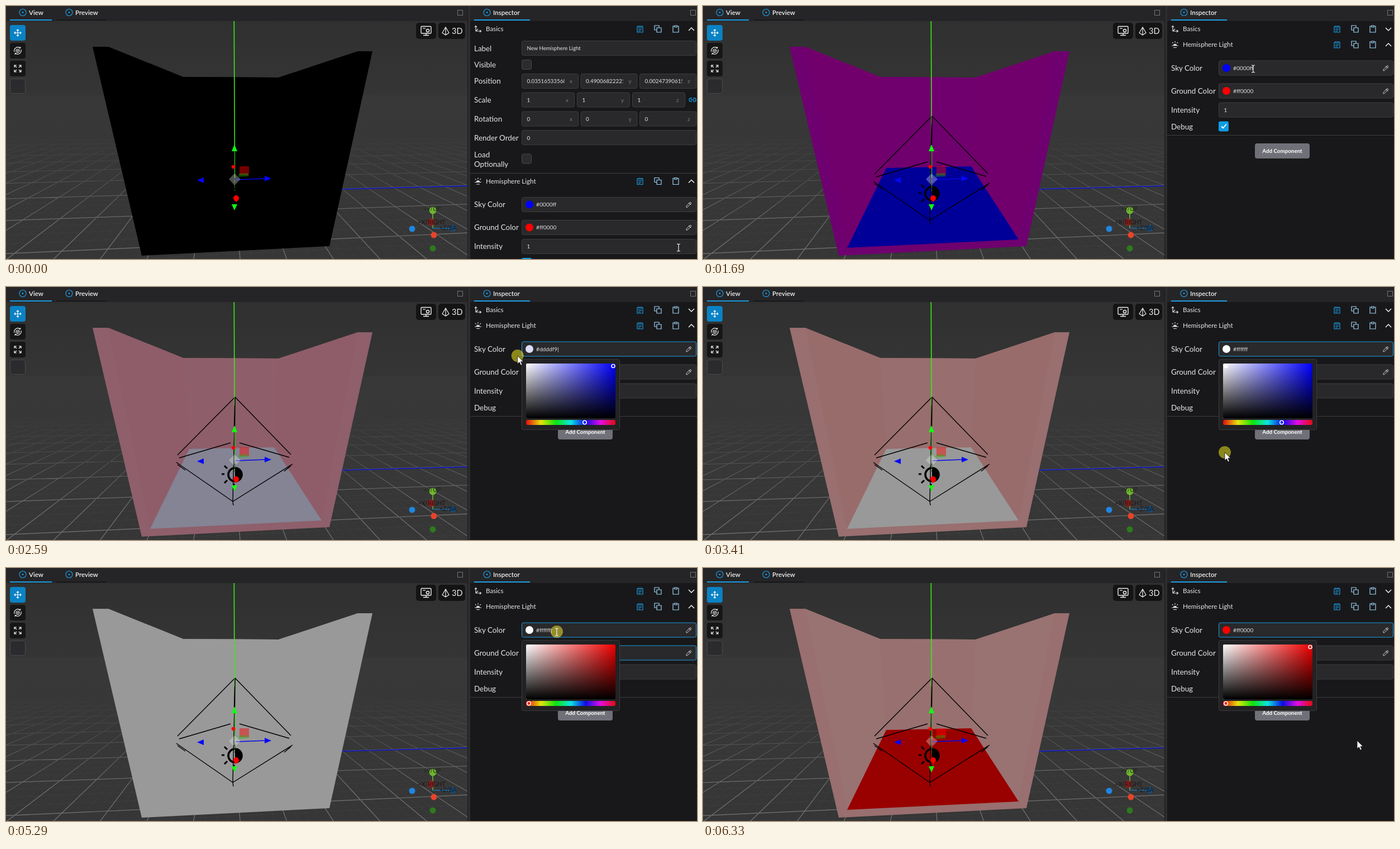
Write an HTML page that moves like this. It is 1237 by 453 pixels and loops after 6.4 s.

```html
<!DOCTYPE html>
<html lang="en">
<head>
<meta charset="utf-8">
<title>Hemisphere light editor</title>
<style>
html, body { margin: 0; width: 100%; height: 100%; overflow: hidden; background: #18181a; }
svg { display: block; }
text { font-family: Lato, Inter, sans-serif; white-space: pre; }
#press { mix-blend-mode: screen; }
</style>
</head>
<body>
<svg id="stage" width="1237" height="453" viewBox="0 0 1237 453"></svg>
<script>
const LOOP = 6400, BLUE = '#1b9ce3', LINE = '#3d3d40';
const stage = document.getElementById('stage');

// Markup helpers
const text = (x, y, s, size = 13.4, fill = '#e6e6e8', more = '') =>
  `<text x="${x}" y="${y + size * .36}" font-size="${size}" fill="${fill}" ${more}>${s}</text>`;
const rect = (x, y, w, h, fill, r = 0, more = '') =>
  `<rect x="${x}" y="${y}" width="${w}" height="${h}" rx="${r}" fill="${fill}" ${more}/>`;
const circle = (x, y, r, fill, more = '') =>
  `<circle cx="${x}" cy="${y}" r="${r}" fill="${fill}" ${more}/>`;
const stroke = (d, color, w = 1.3, more = '') =>
  `<path d="${d}" fill="none" stroke="${color}" stroke-width="${w}" ${more}/>`;
const poly = (pts, fill, more = '') => `<polygon points="${pts}" fill="${fill}" ${more}/>`;
const at = (x, y, s) => `<g transform="translate(${x} ${y})">${s}</g>`;

// Ground grid: perspective of the plane, x towards the back, z to the right
const ground = (x, z) => {
  const a = .17 * x, b = .0083 * z, w = 1 + a + b;
  return ((409 + a * 394 + b * 6400) / w).toFixed(1) + ' ' + ((333 + a * 155 + b * 155) / w).toFixed(1);
};
function gridPath(step, far, wide) {
  let d = '';
  for (let z = -wide; z <= wide; z += step) d += `M${ground(-3, z)}L${ground(far, z)}`;
  for (let x = -3; x <= far; x += step) d += `M${ground(x, -wide)}L${ground(x, wide)}`;
  return d;
}

function tab(x, label, lineX, lineW, color) {
  return circle(x, 11.5, 6, 'none', `stroke="${BLUE}" stroke-width="1.2"`) + circle(x, 11.5, 1.4, BLUE) +
    text(x + 11, 11.5, label, 11.5, '#f2f2f2', 'font-weight="600"') + rect(lineX, 24, lineW, 2, color);
}

const axes = () =>
  stroke('M764 366V398', '#5f9a35', 2) + stroke('M764 398H800', '#24608f', 2) +
  circle(764, 366, 6.5, '#6fb52e') + circle(761, 387, 6.5, '#8b1f1c') + circle(800, 398, 6, '#1c4a72') +
  text(763, 363, '+Y/UP', 10.5, '#1d2b18', 'text-anchor="middle"') +
  text(762, 387, '+X/RIGHT', 10.5, '#241414', 'text-anchor="middle"') +
  text(776, 397, '+Z/BA', 10.5, '#0d1d2c') +
  circle(727, 399, 5.5, '#1f86e0') + circle(766, 410, 5.5, '#e8432a') + circle(764, 434, 5.5, '#2e7a1d');

function tools() {
  const button = (y, fill, icon, edge = '') =>
    rect(7, y, 28, 28, fill, 4, edge && `stroke="${edge}"`) + at(21, y + 14, icon);
  const move = stroke('M-6 0H6M0 -6V6M-4 -2L-6 0L-4 2M4 -2L6 0L4 2M-2 -4L0 -6L2 -4M-2 4L0 6L2 4', '#fff', 1.2);
  const turn = stroke('M-6 2A6.5 6.5 0 0 1 4 -5M6 -2A6.5 6.5 0 0 1 -4 5M5 -7L4.5 -4.5L2 -5M-5 7L-4.5 4.5L-2 5', '#eee', 1.2) +
    stroke('M0 -3L3 -1.5V2L0 3.5L-3 2V-1.5ZM-3 -1.5L0 0L3 -1.5M0 0V3.5', '#eee', 1);
  const size = stroke('M-2 -2L-6 -6M2 -2L6 -6M-2 2L-6 6M2 2L6 6M-6 -2V-6H-2M2 -6H6V-2M-6 2V6H-2M2 6H6V2', '#eee', 1.2);
  return button(34, '#0a82c4', move) + button(66, '#161617', turn) + button(98, '#161617', size) +
    rect(7.5, 130.5, 27, 26, '#2b2b2d', 4, 'stroke="#4a4a4c"') +
    rect(734, 30, 36, 29, '#141415', 5) + rect(774, 30, 48, 29, '#141415', 5) +
    at(752, 44, rect(-9, -7.5, 18, 12.5, 'none', 1.5, 'stroke="#eee" stroke-width="1.4"') +
      stroke('M-5 8.5H5M0 5V8', '#eee', 1.5) + circle(3, 0, 2.6, 'none', 'stroke="#eee" stroke-width="1.5"') +
      stroke('M-6 -4H-1', '#eee', 1.2)) +
    at(787, 45, stroke('M0 -7L-6 3L0 7L6 3ZM0 -7V7', '#eee', 1.2)) + text(798, 45, '3D', 14.5, '#eee');
}

const cube = () =>
  poly('155,73 183,73 317,127 488,128 630,81 656,81 579,430 243,447', '#000', 'id="edge"') +
  poly('183,73 317,127 328,290 258,433', '#000', 'id="left"') +
  poly('488,128 630,81 565,418 480,287', '#000', 'id="right"') +
  poly('317,127 488,128 480,287 328,290', '#000', 'id="back"') +
  poly('258,433 328,290 480,287 565,418', '#000', 'id="floor"');

const helper = () => '<g id="helper">' +
  stroke('M307 301L410 197L510 300M310 306L402 279M418 279L507 305M305 314L406 384L513 317' +
    'M307 318L321 328M510 320L498 330M409 250L406 384L407 391', '#000', 1.4) +
  circle(410, 336, 12, 'none', 'stroke="#000" stroke-width="3.6"') +
  '<path d="M410 324A12 12 0 0 1 410 348Z"/>' +
  stroke('M386 335H391M391 320L396 325M391 351L396 346M409 316V320M408 352V357', '#000', 3) + '</g>';

const gizmo = () =>
  stroke('M408.3 27L409.3 250', '#3bea17', 1.6) +
  stroke('M410 197L409.5 250M409.5 212L408.5 250', '#000', 1.5, 'id="mast"') +
  stroke('M409.5 258V308', '#2fb51a', 1.4) +
  stroke('M409.5 310V331', '#1d6c16', 1.2, 'stroke-dasharray="7 2"') +
  stroke('M412 311L464 309', '#0505e8', 1.5) +
  poly('463,304 475,309 463,314', '#0505ff') + poly('342,312 354,307 354,317', '#0505ff') +
  circle(407, 288, 3.3, '#f00') +
  rect(418, 287, 17, 16, '#f00', 0, 'opacity=".46"') +
  poly('417,300 433,299 434,305 416,306', '#0c0', 'opacity=".35"') +
  poly('409,300 420,310 409,321 399,310', '#fff', 'opacity=".3"') +
  poly('409,248 414,260 404,260', '#1f1') + poly('409,366 414,355 404,355', '#1f1') +
  circle(412, 344, 5, '#f00') + poly('408,347 417,346 412,351', '#f00');

// Inspector parts
const label = (y, s) => text(838, y, s);
const input = (x, y, w, id = '') =>
  rect(x + .5, y - 13, w - 1, 26, '#29292b', 3, `stroke="${LINE}" ${id && `id="${id}"`}`);
const check = (y, on) => on
  ? rect(923, y - 9, 18, 18, '#0d9de4', 3) + stroke(`M928 ${y}L931 ${y + 3}L937 ${y - 4}`, '#fff', 1.8)
  : rect(923.5, y - 8.5, 17, 17, '#2c2c2e', 3, 'stroke="#49494c"');
const number = (x, y, w, v, axis) => input(x, y, w) +
  `<svg x="${x + 9.5}" y="${y - 10}" width="67" height="20">${text(0, 10, v, 9.8)}</svg>` +
  text(x + w - 16, y, axis, 10, '#77777b');
const triple = (y, w, values) => values.map((v, i) => number(923 + i * (w + 4 - (w > 96 ? .5 : 0)), y, w, v, 'xyz'[i])).join('');

function header(y, name, icon) {
  const pad = stroke('M-5 -4H5V6H-5ZM-3 -1H3M-3 1.5H3M-3 4H1M-3 -6V-3M0 -6V-3M3 -6V-3', BLUE, 1.2);
  const copy = stroke('M-2 -2H6V6H-2ZM-2 2H-6V-6H2V-2', '#9dd3f3', 1.2);
  const clip = stroke('M-2 -5H-5V6H5V-5H2M-2 -6H2V-3H-2Z', '#9dd3f3', 1.2);
  return at(845, y, icon) + text(859, y, name, 11.6) + at(1135, y, pad) + at(1167, y, copy) + at(1199, y, clip);
}
const chevron = (y, down) => stroke(down ? `M1222 ${y - 2}L1227 ${y + 3}L1232 ${y - 2}` : `M1222 ${y + 3}L1227 ${y - 2}L1232 ${y + 3}`, '#fff', 1.4);

const basics = () => '<g id="basics">' + chevron(41, false) +
  label(76, 'Label') + input(923, 75.5, 313) + text(932.5, 76, 'New Hemisphere Light', 9.6) +
  label(105, 'Visible') + `<g id="hidden">${check(105, false)}</g><g id="shown">${check(105, true)}</g>` +
  label(134, 'Position') + triple(134.5, 102, ['0.0351653356882', '0.4900682222188', '0.0024739061511']) +
  label(168, 'Scale') + triple(168, 95, ['1', '1', '1']) +
  at(1229, 168, stroke('M-1 -3H-3A3 3 0 0 0 -3 3H-1M1 -3H3A3 3 0 0 1 3 3H1M-3 0H3', BLUE, 1.3)) +
  label(202, 'Rotation') + triple(202, 102, ['0', '0', '0']) +
  label(236, 'Render Order') + input(923, 235.5, 313) + text(932.5, 236, '0', 9.8) +
  label(266, 'Load') + label(283, 'Optionally') + check(273.5, false) +
  rect(831, 299, 406, 1, LINE) + '</g>';

const colorRow = (y, name, id) => label(y, name) + input(923, y, 313, id + 'Box') +
  circle(937, y, 7, '#000', `id="${id}Dot"`) +
  text(949, y, '', 10.2, '#dcdcde', `id="${id}Text"`) +
  at(1222, y, stroke('M-4 5L-4 2.5L1 -2.5L3 -.5L-2 4.5ZM0 -3.5L4 .5M1.5 -2L3 -4.5L5 -2.5L3 -.5', '#d0d0d2', 1));

const light = () => '<g id="light">' +
  header(69, 'Hemisphere Light', stroke('M-6 2H6M0 -6V-3.5M-5 -4L-3.5 -2.5M5 -4L3.5 -2.5M-3 5.5H3', '#ddd', 1.2) +
    '<path d="M-3.2 2A3.2 3.2 0 0 1 3.2 2Z" fill="#ddd"/>') +
  chevron(69, false) + colorRow(111, 'Sky Color', 'sky') + colorRow(152, 'Ground Color', 'gnd') +
  label(186, 'Intensity') + input(923, 186, 313) + text(932.5, 186, '1', 9.8) +
  label(216, 'Debug') + check(215.5, true) + rect(831, 231, 406, 1, LINE) +
  rect(988, 246, 98, 27, '#707078', 4) +
  text(1037, 259.5, 'Add Component', 9.8, '#fff', 'font-weight="700" text-anchor="middle"') + '</g>';

const picker = () => '<g id="picker">' +
  rect(923.5, 129.5, 175, 126, '#222224', 3, 'stroke="#3b3b3e"') +
  rect(931, 137, 160, 98, '#00f', 2, 'id="pure"') + rect(931, 137, 160, 98, 'url(#white)', 2) +
  rect(931, 137, 160, 98, 'url(#black)', 2) + rect(931, 238, 160, 9, 'url(#hues)', 3) +
  circle(0, 242.5, 3.2, '#00f', 'id="hueMark" stroke="#fff" stroke-width="1.6"') +
  circle(0, 141.5, 3, '#00f', 'id="mark" stroke="#fff" stroke-width="1.6"') + '</g>';

const ramp = (id, stops, dir) => `<linearGradient id="${id}" ${dir}>` +
  stops.map(([o, c, a = 1]) => `<stop offset="${o}" stop-color="${c}" stop-opacity="${a}"/>`).join('') + '</linearGradient>';
const DOWN = 'x1="0" y1="0" x2="0" y2="1"';
const hueStops = [0, 1, 2, 3, 4, 5, 6].map(i => [i / 6, `hsl(${i * 60 % 360} 90% 47%)`]);

stage.innerHTML = '<defs>' +
  ramp('white', [[0, '#fff'], [1, '#fff', 0]], '') + ramp('black', [[0, '#000', 0], [1, '#000']], DOWN) +
  ramp('hues', hueStops, '') +
  ramp('air', [[0, '#303030'], [.31, '#353535'], [.315, '#383838'], [1, '#363636']], DOWN) +
  ramp('fade', [[0, '#fff', 0], [.3, '#fff', .3], [.75, '#fff', .95], [1, '#fff']], DOWN) +
  `<mask id="far" maskUnits="userSpaceOnUse" x="0" y="0" width="827" height="453">${rect(0, 230, 827, 223, 'url(#fade)')}</mask>` +
  '<clipPath id="view"><rect y="27" width="827" height="426"/></clipPath></defs>' +
  '<g clip-path="url(#view)">' + rect(0, 27, 827, 426, 'url(#air)') +
  '<g mask="url(#far)">' + stroke(gridPath(.25, 8, 24), '#8a8a8a', .7, 'opacity=".2" stroke-dasharray="3 2"') +
  stroke(gridPath(1, 22, 40), '#757575', 1.2) + '</g>' +
  stroke('M410 333.2L601 328L827 322', '#0a14d8', 1.5) + cube() + helper() + gizmo() + axes() + '</g>' +
  rect(0, 0, 827, 27, '#252527') + tab(30, 'View', 7, 75, BLUE) + tab(113, 'Preview', 91, 89, '#18191b') +
  tools() + rect(827, 0, 4, 453, '#2d2d2f') + rect(826, 0, 1, 453, '#1a1a1b') +
  rect(831, 0, 406, 27, '#252527') + rect(831, 27, 406, 426, '#18181a') +
  tab(861, 'Inspector', 838, 100, BLUE) +
  [808, 1225].map(x => rect(x + .5, 7.5, 9, 9, 'none', 0, 'stroke="#747478"')).join('') +
  header(41, 'Basics', stroke('M-4 -5V4H5M-6 -3L-4 -5.5L-2 -3M3 2L5.5 4L3 6M-4 4L0 0', '#ddd', 1.2)) +
  `<g id="folded">${chevron(41, true)}</g>` + basics() + light() + picker() +
  circle(0, 0, 11, '#807a00', 'id="press"') + '<g id="cursor">' +
  '<path id="arrow" d="M0 0V14.5L3.4 11.5L5.8 17L8.2 16L5.9 10.6H10.5Z" fill="#fff" stroke="#111" stroke-width=".8"/>' +
  `<g id="beam">${stroke('M-3 -6Q0 -6 0 -4.5Q0 -6 3 -6M0 -5V6M-3 7Q0 7 0 5.5Q0 7 3 7', '#eee', 1.2)}</g></g>`;

const el = {};
stage.querySelectorAll('[id]').forEach(n => el[n.id] = n);
const show = (id, on) => el[id].style.display = on ? '' : 'none';
const set = (id, o) => { for (const k in o) el[id].setAttribute(k, o[k]); };

// Pointer path: time, x, y
const path = [
  [0, 1204, 432], [70, 1204, 432], [660, 932, 105], [800, 932, 105], [1120, 897, 46], [1410, 897, 46],
  [1680, 985, 112], [1800, 985, 112], [2040, 1040, 192], [2110, 1040, 192], [2380, 993.8, 165.4],
  [2450, 982, 156], [2720, 855, 93], [3100, 855, 93], [3380, 934, 296], [3490, 934, 296],
  [3740, 985, 152], [3880, 985, 152], [4240, 1019, 212], [4390, 1019, 212], [4450, 1013, 209],
  [5000, 918, 165], [5140, 918, 165], [5270, 986, 114], [5370, 986, 114], [5500, 1030, 165],
  [5690, 1105, 98], [5860, 1105, 98], [6320, 1171, 309], [6400, 1171, 309]
];
const presses = [[660, 800], [1220, 1345], [1700, 1790], [2110, 2900], [3370, 3460], [3790, 3880], [4450, 5120], [5270, 5360], [5500, 5860]];
const within = (t, a, b) => t >= a && t < b;
const clamp = v => Math.min(1, Math.max(0, v));

function pointer(t) {
  const i = Math.max(1, path.findIndex(p => p[0] > t));
  const [t0, x0, y0] = path[i - 1], [t1, x1, y1] = path[i], k = (t - t0) / (t1 - t0);
  return [x0 + (x1 - x0) * k, y0 + (y1 - y0) * k];
}

// The chosen colour follows the pointer a little late
function pick(t, top, hue) {
  const [x, y] = pointer(t - 70);
  const v = 255 * clamp(1 - (y - top) / 98), low = v * (1 - clamp((x - 931) / 160));
  return [0, 1, 2].map(i => Math.round(i === hue ? v : low));
}
const skyAt = t => t < 2110 ? [0, 0, 255] : t < 5500 ? pick(Math.min(t, 2900), 137, 2) : pick(Math.min(t, 5840), 137, 0);
const groundAt = t => t < 4450 ? [255, 0, 0] : pick(Math.min(t, 5140), 178, 0);
const hex = c => '#' + c.map(v => v.toString(16).padStart(2, '0')).join('');

// Hemisphere lighting in linear space
const toLinear = v => (v /= 255) <= .04045 ? v / 12.92 : ((v + .055) / 1.055) ** 2.4;
const toScreen = v => Math.round(255 * (v <= .0031308 ? v * 12.92 : 1.055 * v ** (1 / 2.4) - .055));
const shade = (sky, gnd, up) => hex(sky.map((s, i) => toScreen((toLinear(s) * up + toLinear(gnd[i]) * (1 - up)) / Math.PI)));
const faces = { edge: .5, left: .475, right: .475, back: .49, floor: 1 };

function draw(t) {
  const lit = t >= 750, folded = t >= 1330;
  const sky = skyAt(t), gnd = groundAt(t);
  for (const f in faces) set(f, { fill: lit ? shade(sky, gnd, faces[f]) : '#000' });
  for (const id of ['helper', 'mast', 'shown']) show(id, lit);
  show('hidden', !lit);
  show('basics', !folded); show('folded', folded);
  set('light', { transform: `translate(0 ${folded ? 0 : 244.5})` });

  const onGround = within(t, 3840, 5280);
  const onSky = within(t, 1760, 3480) || t >= 5280;
  set('skyBox', { stroke: onSky ? BLUE : LINE });
  set('gndBox', { stroke: within(t, 3840, 5340) ? BLUE : LINE });
  const dragSky = within(t, 2110, 2730) || within(t, 5500, 5700), dragGround = within(t, 4450, 5080);
  el.skyText.textContent = hex(sky) + (dragSky || within(t, 5280, 5340) ? '|' : '');
  el.gndText.textContent = hex(gnd) + (dragGround ? '|' : '');
  set('skyDot', { fill: hex(sky) });
  set('gndDot', { fill: hex(gnd) });

  show('picker', onSky || onGround);
  set('picker', { transform: `translate(0 ${onGround ? 41 : 0})` });
  const pure = t < 3700 ? '#0000ff' : '#f00000';
  set('pure', { fill: pure });
  set('hueMark', { cx: t < 3700 ? 1036 : 936, fill: pure });
  const white = within(t, 2730, 3700) || within(t, 5080, 5280);
  show('mark', !within(t, 5280, 5700));
  set('mark', { cx: white ? 936 : 1087, fill: white ? '#fff' : pure });

  const [x, y] = pointer(t);
  const beam = t < 120 || within(t, 1640, 1850) || within(t, 3740, 3920) || within(t, 5260, 5410);
  set('cursor', { transform: `translate(${x.toFixed(1)} ${y.toFixed(1)})` });
  set('press', { cx: x.toFixed(1), cy: y.toFixed(1) });
  show('beam', beam); show('arrow', !beam);
  show('press', presses.some(([a, b]) => within(t, a, b)));
}

function tick() {
  draw(performance.now() % LOOP);
  requestAnimationFrame(tick);
}
tick();
</script>
</body>
</html>
```
